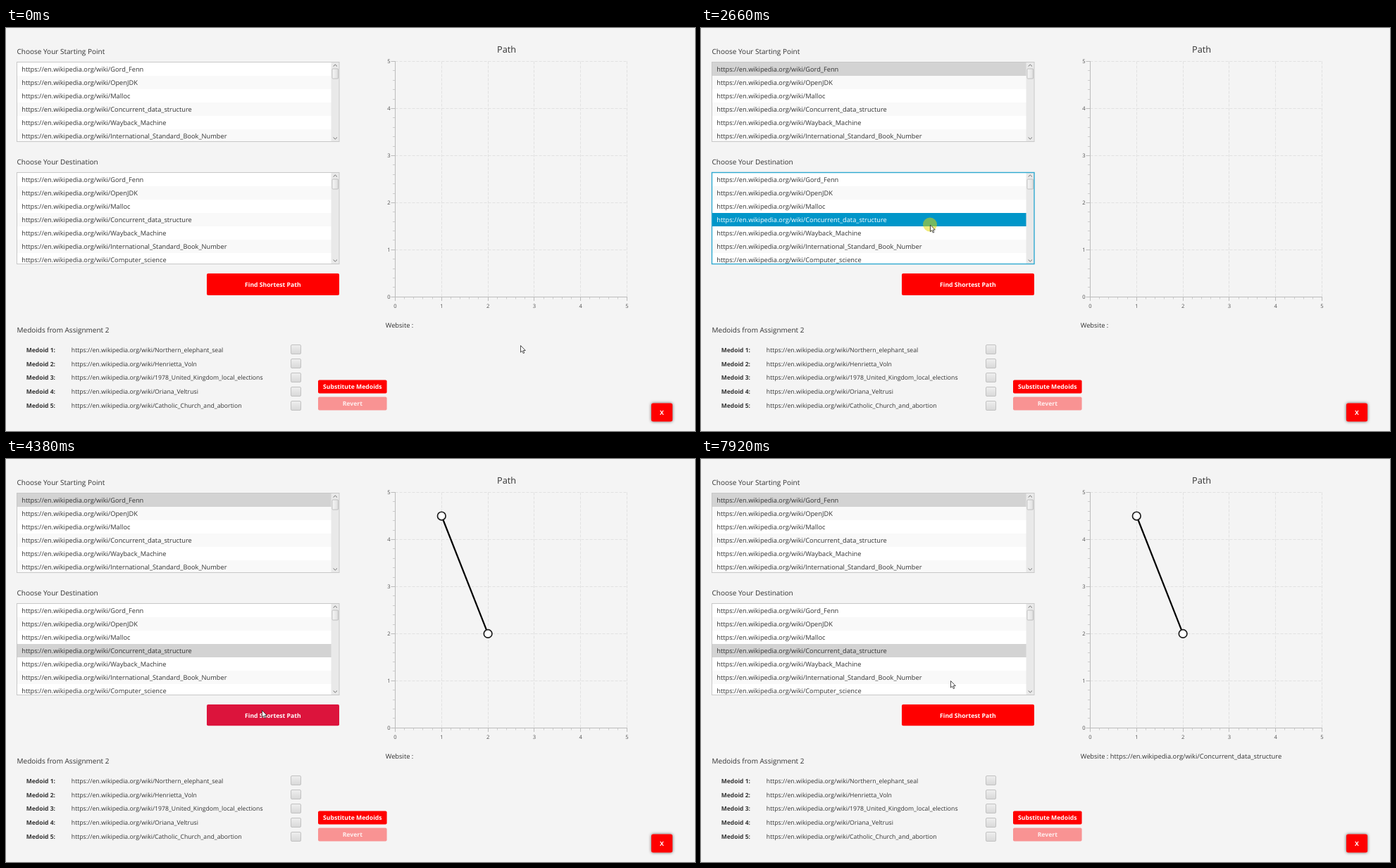
Write an HTML page that moves like this. It is 978 px wide and 573 px high and loops after 8 s.

```html
<!DOCTYPE html>
<html lang="en">
<head>
<meta charset="utf-8">
<title>Shortest path</title>
<style>
html, body { margin: 0; width: 100%; height: 100%; overflow: hidden; background: #f4f4f4; }
svg { display: block; width: 978px; height: 573px; }
text { font: 9.25px "Open Sans", "Noto Sans", sans-serif; fill: #333; text-rendering: geometricPrecision; white-space: pre; }
.label { font-size: 10px; }
.title { font-size: 12.7px; text-anchor: middle; }
.tick { font-size: 7.6px; fill: #505050; }
.small { font-size: 8.7px; }
.bold { font-size: 8.5px; font-weight: 700; }
.btn { font-size: 8.65px; font-weight: 700; fill: #fff; text-anchor: middle; }
.mid { text-anchor: middle; }
.end { text-anchor: end; }
#site { font-size: 9.33px; }
.frame { fill: none; stroke: #c8c8c8; }
.selected .pick { fill: #d3d3d3; }
.focused .pick { fill: #0096c9; }
.focused .picked { fill: #fff; }
.focused .frame { stroke: #2fa9d0; stroke-width: 1.4; }
.grid { stroke: #e1e1e1; stroke-dasharray: 4 2; }
.axis { stroke: #bcbcbc; fill: none; }
.minor { stroke: #cdcdcd; fill: none; }
.node { fill: #fff; stroke: #1c1c1c; stroke-width: 1.7; }
</style>
</head>
<body>
<svg viewBox="0 0 978 573">
  <defs>
    <linearGradient id="grey" x2="0" y2="1">
      <stop stop-color="#efefef"/><stop offset="1" stop-color="#d8d8d8"/>
    </linearGradient>
    <linearGradient id="thumb">
      <stop stop-color="#f6f6f6"/><stop offset="1" stop-color="#dedede"/>
    </linearGradient>
    <filter id="shadow" x="-30%" y="-30%" width="160%" height="160%">
      <feDropShadow dx="0" dy="0" stdDeviation="2" flood-color="#000" flood-opacity=".65"/>
    </filter>
  </defs>

  <text class="label" x="15.5" y="36.7">Choose Your Starting Point</text>
  <g id="start"></g>
  <text class="label" x="15.5" y="193.5">Choose Your Destination</text>
  <g id="goal"></g>

  <rect id="find" x="285" y="349" width="188" rx="2" fill="#f00"/>
  <text class="btn" x="378.8" y="367.7">Find Shortest Path</text>

  <text class="label" x="15.5" y="432.5">Medoids from Assignment 2</text>
  <g id="medoids"></g>
  <rect x="443" y="500.5" width="97.6" height="19" rx="2" fill="#f00"/>
  <text class="btn" x="491.8" y="513">Substitute Medoids</text>
  <rect x="443" y="524.5" width="97.6" height="19" rx="2" fill="#f00" opacity=".4"/>
  <text class="btn" x="491.8" y="537.2" opacity=".85">Revert</text>
  <rect x="916" y="533.5" width="30" height="26" rx="2.5" fill="#f00" filter="url(#shadow)"/>
  <text class="btn" x="931" y="549.8">X</text>

  <text class="title" x="710.5" y="35">Path</text>
  <g id="chart"></g>
  <g id="path">
    <line id="edge" stroke="#000" stroke-width="2.2"/>
    <circle id="first" class="node" r="5.8"/>
    <circle id="second" class="node" r="5.8"/>
  </g>
  <text id="site" x="538.7" y="426.4"></text>

  <circle id="click" r="10" fill="#e1d700" fill-opacity=".52"/>
  <path id="cursor" d="M.5 .5V10.1L2.7 8.1L4.3 11.6L5.8 10.9L4.3 7.5H7.3Z" fill="#fff" stroke="#222" stroke-width=".8" stroke-linejoin="round"/>
</svg>
<script>
const LOOP = 8000;
const WIKI = "https://en.wikipedia.org/wiki/";
const PAGES = ["Gord_Fenn", "OpenJDK", "Malloc", "Concurrent_data_structure",
  "Wayback_Machine", "International_Standard_Book_Number", "Computer_science"];
const MEDOIDS = ["Northern_elephant_seal", "Henrietta_Voln",
  "1978_United_Kingdom_local_elections", "Oriana_Veltrusi", "Catholic_Church_and_abortion"];

const el = id => document.getElementById(id);
const set = (node, attrs) => { for (const k in attrs) node.setAttribute(k, attrs[k]); };
const text = (x, y, s, cls = "") => `<text x="${x}" y="${y}" class="${cls}">${s}</text>`;
const rect = (x, y, w, h, more) => `<rect x="${x}" y="${y}" width="${w}" height="${h}" ${more}/>`;
const px = v => 552.5 + 65.8 * v;
const py = v => 382.3 - 66.95 * v;
const snap = v => Math.floor(v + .01) + .5;

function list(id, top, height, count, pick) {
  const bottom = top + height;
  let rows = "";
  for (let i = 0; i < count; i++) {
    const y = top + 19 * i, on = i === pick;
    rows += rect(16, y, 446, 19, `fill="${i % 2 ? "#f9f9f9" : "#fff"}" class="${on ? "pick" : ""}"`)
      + text(22.3, y + 13, WIKI + PAGES[i], on ? "picked" : "");
  }
  const arrow = (y, d) => `<path d="M464.6 ${y}l2.7 ${d}l2.7 ${-d}" fill="none" stroke="#707070"/>`;
  el(id).innerHTML = `<clipPath id="${id}Clip">${rect(15, top - 1, 459, height + 1, "")}</clipPath>
    <g clip-path="url(#${id}Clip)">${rect(16, top, 457, height, 'fill="#fff"')}${rows}</g>`
    + rect(461.5, top, 11.5, height, 'fill="#e9e9e9"')
    + rect(463, top + 9, 8.6, 14, 'rx="1" fill="url(#thumb)" stroke="#b4b4b4" stroke-width=".8"')
    + arrow(top + 5.5, -2.5) + arrow(bottom - 6, 2.5)
    + rect(15.5, top - .5, 457.5, height + .5, 'class="frame"');
}

function chart() {
  let out = "", major = "", minor = "";
  for (let v = 0; v <= 5; v++) {
    const x = snap(px(v)), y = snap(py(v));
    if (v) out += `<path class="grid" d="M${x} 47.5V382M552.5 ${y}H881.5"/>`;
    major += `M${x} 382v6M552.5 ${y}h-6`;
    out += text(px(v), 397.8, v, "tick mid") + text(545.5, py(v) + 2.9, v, "tick end");
    for (let k = 1; k < 5 && v < 5; k++) {
      minor += `M${snap(px(v + k / 5))} 382v3.5M552.5 ${snap(py(v + k / 5))}h-3.5`;
    }
  }
  el("chart").innerHTML = out + `<path class="minor" d="${minor}"/>
    <path class="axis" d="M552.5 47V382.5H882${major}"/>`;
}

list("start", 49, 112.5, 6, 0);
list("goal", 206, 129.5, 7, 3);
chart();
el("medoids").innerHTML = MEDOIDS.map((name, i) => {
  const y = 460.7 + 19.8 * i;
  return text(28.8, y, `Medoid ${i + 1}:`, "bold") + text(92.8, y, WIKI + name, "small")
    + rect(404.5, Math.round(y - 10.4) + .5, 14, 13, 'rx="1.5" fill="url(#grey)" stroke="#c2c2c2"');
}).join("");

// Mouse moves: begin, end, steps, x, y, easing
const linear = u => u;
const smooth = u => u * u * (3 - 2 * u);
const out = u => 1 - (1 - u) ** 3;
const HOME = [730, 451];
const MOVES = [
  [340, 570, 4, 358, 186.5, smooth],
  [720, 1420, 10, 291, 63, smooth],
  [2030, 2260, 4, 349, 190, smooth],
  [2340, 2500, 3, 325, 279.5, out],
  [2890, 3190, 5, 363, 357, smooth],
  [4680, 5150, 7, 608, 93, smooth],
  [5220, 5450, 4, 613, 84, linear],
  [5530, 5530, 1, 612.5, 83, linear],
  [5680, 5680, 1, 613, 82, linear],
  [6140, 6910, 11, 686, 243, out],
  [7690, 7920, 4, 354, 315, smooth]
];
const CLICKS = [[1650, 1800], [2660, 2890], [3420, 3670]];

// Share of a move done when it jumps n times, first at a, last at b
function stepped(t, a, b, n) {
  if (t < a) return 0;
  const gap = (b - a) / (n - 1 || 1) || 1;
  return Math.min(n, Math.floor((t - a) / gap + .08) + 1) / n;
}

function mouse(t) {
  let [x, y] = HOME;
  for (const [a, b, n, tx, ty, ease] of MOVES) {
    const u = ease(stepped(t, a, b, n));
    x += (tx - x) * u;
    y += (ty - y) * u;
  }
  return [x, y];
}

function easeBoth(u) {
  u = Math.max(0, Math.min(1, u));
  return u < .2 ? 3.125 * u * u : u > .8 ? 1 - 3.125 * (1 - u) ** 2 : 1.25 * u - .125;
}

function drawPath(t) {
  const step = 77.5;
  el("path").style.display = t < 3670 ? "none" : "";
  const age = Math.floor((t - 3670) / step + .1) * step;
  const x = px(age < 380 ? 1 : 2);
  const y = py(4.5 - 2.5 * easeBoth(age / 700));
  set(el("edge"), { x1: px(1), y1: py(4.5), x2: x, y2: y });
  set(el("first"), { cx: px(1), cy: py(4.5), opacity: easeBoth(age / 500) });
  set(el("second"), { cx: x, cy: y });
}

function state(id, t, from, to) {
  set(el(id), { class: t < from ? "" : t < to ? "selected focused" : "selected" });
}

function draw() {
  const t = performance.now() % LOOP;
  const [x, y] = mouse(t);
  const over = x > 285 && x < 473 && y > 349 && y < 380;
  const site = t < 5450 ? "" : WIKI + PAGES[t < 6680 ? 0 : 3];
  const label = "Website : " + site;

  state("start", t, 1720, 2660);
  state("goal", t, 2660, 3420);
  set(el("find"), { fill: over ? "#dc143c" : "#f00", height: t < 3110 ? 31 : 30.3 });
  drawPath(t);
  if (el("site").textContent !== label) el("site").textContent = label;
  set(el("cursor"), { transform: `translate(${x} ${y})` });
  set(el("click"), { cx: x, cy: y });
  el("click").style.display = CLICKS.some(([a, b]) => t >= a && t < b) ? "" : "none";
  requestAnimationFrame(draw);
}
draw();
</script>
</body>
</html>
```
